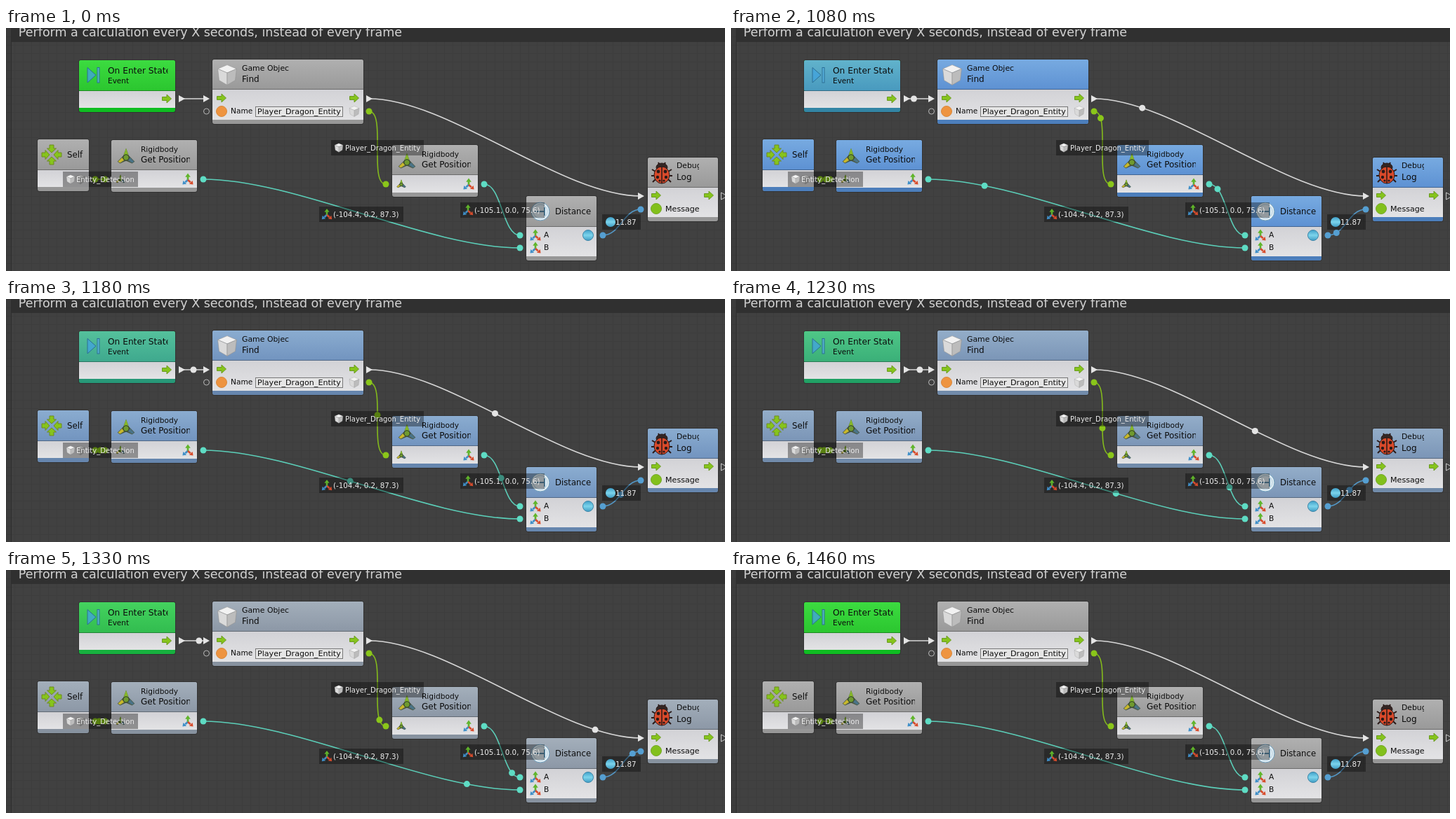
Animation, 1024 px wide and 347 px high, one loop 2070 ms. Source, as an HTML page:

```html
<!DOCTYPE html>
<html lang="en">
<head>
<meta charset="utf-8">
<title>Node graph</title>
<style>
  html, body { margin: 0; width: 100%; height: 100%; overflow: hidden; background: #414141; }
  svg { display: block; width: 1024px; height: 347px; }
  text { font-family: "DejaVu Sans", Verdana, sans-serif; fill: #0c0c0c; white-space: pre; }
  .light { fill: #ececec; }
</style>
</head>
<body>
<svg id="stage" viewBox="0 0 1024 347" xmlns="http://www.w3.org/2000/svg">
  <defs>
    <linearGradient id="gray" x2="0" y2="1"><stop stop-color="#b0b0b0"/><stop offset="1" stop-color="#999"/></linearGradient>
    <linearGradient id="green" x2="0" y2="1"><stop stop-color="#3cdc40"/><stop offset="1" stop-color="#2bc62f"/></linearGradient>
    <linearGradient id="blue" x2="0" y2="1"><stop stop-color="#6aa9ec"/><stop offset="1" stop-color="#4f8fe0"/></linearGradient>
    <linearGradient id="body" x2="0" y2="1"><stop stop-color="#d2d2d6"/><stop offset="1" stop-color="#e3e3e5"/></linearGradient>
    <linearGradient id="sky" x2="0" y2="1"><stop stop-color="#3f9fc8"/><stop offset=".5" stop-color="#7cd4ec"/><stop offset="1" stop-color="#3f9cc4"/></linearGradient>
    <pattern id="minor" width="12" height="12" patternUnits="userSpaceOnUse"><path d="M0 .5H12M.5 0V12" stroke="#3d3d3d"/></pattern>
    <g id="cube" stroke="#8f8f8f" stroke-width=".6" stroke-linejoin="round">
      <path d="M0-15L14-9 0-3-14-9Z" fill="#f2f2f2"/>
      <path d="M-14-9L0-3V15L-12 8Z" fill="#dadada"/>
      <path d="M14-9L0-3V15L12 8Z" fill="#bcbcbc"/>
    </g>
    <path id="arrow" d="M-6.5-2.5H0V-6L6.5 0 0 6V2.5H-6.5Z" fill="#86c41c" stroke="#6a9a22"/>
    <g id="axis" stroke-width="2.8">
      <path d="M0 1V-4" stroke="#5fb52a"/>
      <path d="M0-9L4-3.5H-4Z" fill="#5fb52a"/>
      <path d="M0 1L-4 4.5" stroke="#3f8fc8"/>
      <path d="M-8 8L-7 2-2 7Z" fill="#3f8fc8"/>
      <path d="M0 1L4 4.5" stroke="#d84c2c"/>
      <path d="M8 8L7 2 2 7Z" fill="#d84c2c"/>
    </g>
    <g id="rigid">
      <path d="M0-13L4-2 13 7 9 10 0 6-9 10-13 7-4-2Z" fill="#4c5a48"/>
      <path d="M0-13L3.5-3H-3.5Z" fill="#86b82a"/>
      <path d="M-12 7L-6 1-3 5-9 9Z" fill="#c8b82c"/>
      <path d="M12 7L6 1 3 5 9 9Z" fill="#4a7488"/>
      <circle cy="1" r="4.4" fill="#6f9a30" stroke="#2a332a"/>
    </g>
    <path id="inward" d="M-3-14H3V-9H6.5L0-3-6.5-9H-3Z" fill="#86c41c" stroke="#6f8a22"/>
    <g id="bug" stroke="#2a1a18">
      <path d="M-14-5L-9-2M-15 4H-10M-13 13L-8 8M14-5L9-2M15 4H10M13 13L8 8M-5-15L-3-11M5-15L3-11" stroke-width="2"/>
      <ellipse cy="-8" rx="8" ry="6" fill="#332624"/>
      <ellipse cy="3" rx="11" ry="12" fill="#d84a2b"/>
      <path d="M0-9V15" stroke-width="1.5"/>
      <g fill="#2a1a18" stroke="none"><circle cx="-5" cy="-2" r="2.4"/><circle cx="5" cy="-2" r="2.4"/><circle cx="-6" cy="6" r="2.2"/><circle cx="6" cy="6" r="2.2"/><circle cx="-3" cy="11" r="1.6"/><circle cx="3" cy="11" r="1.6"/></g>
    </g>
  </defs>
</svg>
<script>
const LOOP = 2070, START = 980, STEP = 25;
const WHITE = '#e4e4e4', TEAL = '#5edcc4', BLUE = '#559fd2', LIME = '#8ac61a';
const stage = document.getElementById('stage');
let art = '';

const add = s => { art += s; };
const rect = (x, y, w, h, fill, more = '') =>
  add(`<rect x="${x}" y="${y}" width="${w}" height="${h}" fill="${fill}" ${more}/>`);
const text = (x, y, size, str, more = '') =>
  add(`<text x="${x}" y="${y}" font-size="${size}" ${more}>${str}</text>`);
const icon = (id, x, y, scale = 1, more = '') =>
  add(`<use href="#${id}" transform="translate(${x} ${y}) scale(${scale}) ${more}"/>`);
const ball = (x, y, r, fill, edge = 'none') =>
  add(`<circle cx="${x}" cy="${y}" r="${r}" fill="${fill}" stroke="${edge}"/>`);
const flow = (x, y, fill = WHITE, edge = 'none') =>
  add(`<path d="M${x - 4} ${y - 5}L${x + 5} ${y} ${x - 4} ${y + 5}Z" fill="${fill}" stroke="${edge}"/>`);

// Header, body and footer, with a blue glow that fades while the node is active.
function node(x, y, w, split, foot, skin = 'gray', base = '#979797') {
  const h = foot + 6 - y;
  rect(x - 1, y - 1, w + 2, h + 2, '#2b2b2b', 'rx="4" opacity=".6"');
  rect(x, y, w, h, base, 'rx="3"');
  rect(x, y, w, h, '#3c79c4', 'rx="3" class="glow"');
  rect(x, y, w, split + 1 - y, `url(#${skin})`, 'rx="3"');
  rect(x, y, w, split + 1 - y, 'url(#blue)', 'rx="3" class="glow"');
  rect(x, split + 1, w, foot - split - 1, 'url(#body)');
  rect(x, split, w, 1, '#000', 'opacity=".3"');
}

function label(x, y, w, str, kind, tx) {
  rect(x, y, w, 22, '#000', 'opacity=".36"');
  if (kind === 'ball') ball(x + 12, y + 11, 7, 'url(#sky)');
  else icon(kind, x + 11, y + 11, kind === 'cube' ? .42 : .9);
  text(tx, y + 15, kind === 'cube' ? 10 : 10.3, str, 'class="light"');
}

// Backdrop
rect(0, 0, 1024, 347, '#414141');
rect(0, 0, 1024, 347, 'url(#minor)');
rect(0, 0, 7, 347, '#000', 'opacity=".08"');
rect(7, 0, 1, 347, '#2e2e2e');
rect(8, 0, 1016, 20, '#303030');
text(17.8, 12, 17.52, 'Perform a calculation every X seconds, instead of every frame', 'style="fill:#d2d2d2"');

// Nodes
node(104, 46, 137, 89, 114, 'green', '#0fbd22');
add('<path d="M116 56.5V78L128 67.2Z" fill="#42a4dc" fill-opacity=".8" stroke="#2c6f94"/>');
rect(130, 56.5, 3, 21.5, '#58b4e4', 'stroke="#2c6f94" fill-opacity=".8"');
add('<clipPath id="c1"><path d="M140 46h90.5v40h-90.5z"/></clipPath>');
text(145, 65, 12.2, 'On Enter State', 'clip-path="url(#c1)"');
text(145, 79, 10.5, 'Event');
icon('arrow', 229, 101);

node(294, 45, 215, 87, 131);
icon('cube', 315, 67, .96);
add('<clipPath id="c2"><path d="M330 45h73v40h-73z"/></clipPath>');
text(336, 61, 10.9, 'Game Object', 'clip-path="url(#c2)"');
text(336, 77, 12.1, 'Find');
icon('arrow', 307, 100);
icon('arrow', 496, 100);
ball(307, 119, 7.5, '#ee9440', '#d8883c');
text(320, 122, 10.6, 'Name');
rect(355.5, 112.5, 124, 14, '#e6e6e6', 'stroke="#777"');
text(358, 123, 11.1, 'Player_Dragon_Entity');
icon('cube', 496, 119, .5);

node(45, 159, 73, 202, 227);
for (const a of [0, 90, 180, 270]) icon('inward', 65, 181, 1, `rotate(${a})`);
text(87, 185, 11.8, 'Self');
icon('cube', 106, 216, .45);

for (const [x, y, id] of [[150, 160, 'c3'], [550, 167, 'c4']]) {
  node(x, y, 122, y + 42, y + 68);
  icon('rigid', x + 21, y + 24, .95);
  add(`<clipPath id="${id}"><path d="M${x + 38} ${y}h74v42h-74z"/></clipPath>`);
  text(x + 42, y + 17, 10.6, 'Rigidbody');
  text(x + 42, y + 32, 12, 'Get Position', `clip-path="url(#${id})"`);
  icon('rigid', x + 13, y + 56, .52);
  icon('axis', x + 109, y + 56, .95);
}

node(741, 240, 100, 283, 326);
ball(761, 262, 13, '#e4eff5', '#6d9dba');
ball(761, 262, 10, 'none', '#a9c8da');
add('<path d="M753 262H767M767 256V268" stroke="#5f90ad" stroke-width="2" fill="none"/>');
text(782, 266, 11.7, 'Distance');
icon('axis', 754, 296, .95);
icon('axis', 754, 314, .95);
text(766, 299, 10.6, 'A');
text(766, 317, 10.6, 'B');
ball(829, 296, 7.5, 'url(#sky)', '#3f86a8');

node(914, 185, 100, 227, 270);
icon('bug', 934, 207);
add('<clipPath id="c5"><path d="M950 185h37v30h-37z"/></clipPath>');
text(955, 200, 10.8, 'Debug', 'clip-path="url(#c5)"');
text(955, 217, 12.1, 'Log');
icon('arrow', 926, 239);
icon('arrow', 1001, 239);
ball(926, 258, 7.5, '#82c01c', '#76a82a');
text(939, 262, 11.1, 'Message');

// Cables: start, end, colour, colour of the bead as it leaves
const cables = [
  [250, 101, 285, 101, WHITE],
  [517, 101, 904, 240, WHITE],
  [517, 119, 541, 223, LIME],
  [127, 216, 141, 216, LIME],
  [281, 216, 732, 314, TEAL, '#68b0e2'],
  [681, 223, 732, 296, TEAL, '#68b0e2'],
  [850, 296, 904, 259, BLUE, '#78b4ea']
].map(([x0, y0, x1, y1, color, first = color]) => {
  const reach = Math.max(25, (x1 - x0) * .29);
  return { xs: [x0, x0 + reach, x1 - reach, x1], ys: [y0, y0, y1, y1], color, first };
});
for (const { xs, ys, color } of cables) {
  add(`<path d="M${xs[0]} ${ys[0]}C${xs[1]} ${ys[1]} ${xs[2]} ${ys[2]} ${xs[3]} ${ys[3]}" fill="none" stroke="${color}" stroke-width="1.6" opacity=".92"/>`);
  for (const i of [0, 3]) color === WHITE ? flow(xs[i], ys[i]) : ball(xs[i], ys[i], 4.5, color);
}
ball(285.5, 119, 4, 'none', '#b8b8b8');
flow(1022.5, 240, 'none', '#c8c8c8');
add('<g id="beads">' + cables.map(() => '<circle r="4.5"/>').join('') + '</g>');

// Live values
label(81, 205, 107, 'Entity_Detection', 'cube', 100);
label(463, 160, 132, 'Player_Dragon_Entity', 'cube', 483);
label(446, 255, 120, '(-104.4, 0.2, 87.3)', 'axis', 466);
label(647, 249, 120, '(-105.1, 0.0, 75.6)', 'axis', 667);
label(849, 266, 55, '11.87', 'ball', 868);

stage.insertAdjacentHTML('beforeend', art);
const glows = stage.querySelectorAll('.glow');
const beads = document.getElementById('beads');
const dots = [...beads.children];

// Progress of the pulse: time since it began, share of the way
const pace = [[0, .012], [100, .19], [150, .345], [250, .587], [350, .82], [425, 1]];

function progress(ms) {
  const i = pace.findIndex(p => p[0] > ms);
  if (i < 1) return 1;
  const [a, p] = pace[i - 1], [b, q] = pace[i];
  return p + (q - p) * (ms - a) / (b - a);
}

const bezier = ([a, b, c, d], t) => {
  const u = 1 - t;
  return a * u * u * u + 3 * b * u * u * t + 3 * c * u * t * t + d * t * t * t;
};

const origin = performance.now();

function draw() {
  const now = (performance.now() - origin) % LOOP - START;
  const t = now < 0 ? 1 : progress(Math.floor(now / STEP) * STEP);
  for (const g of glows) g.style.opacity = 1 - t;
  beads.style.display = t < 1 ? '' : 'none';
  cables.forEach((c, i) => {
    dots[i].setAttribute('cx', bezier(c.xs, t));
    dots[i].setAttribute('cy', bezier(c.ys, t));
    dots[i].setAttribute('fill', t < .05 ? c.first : c.color);
  });
  requestAnimationFrame(draw);
}
draw();
</script>
</body>
</html>
```
